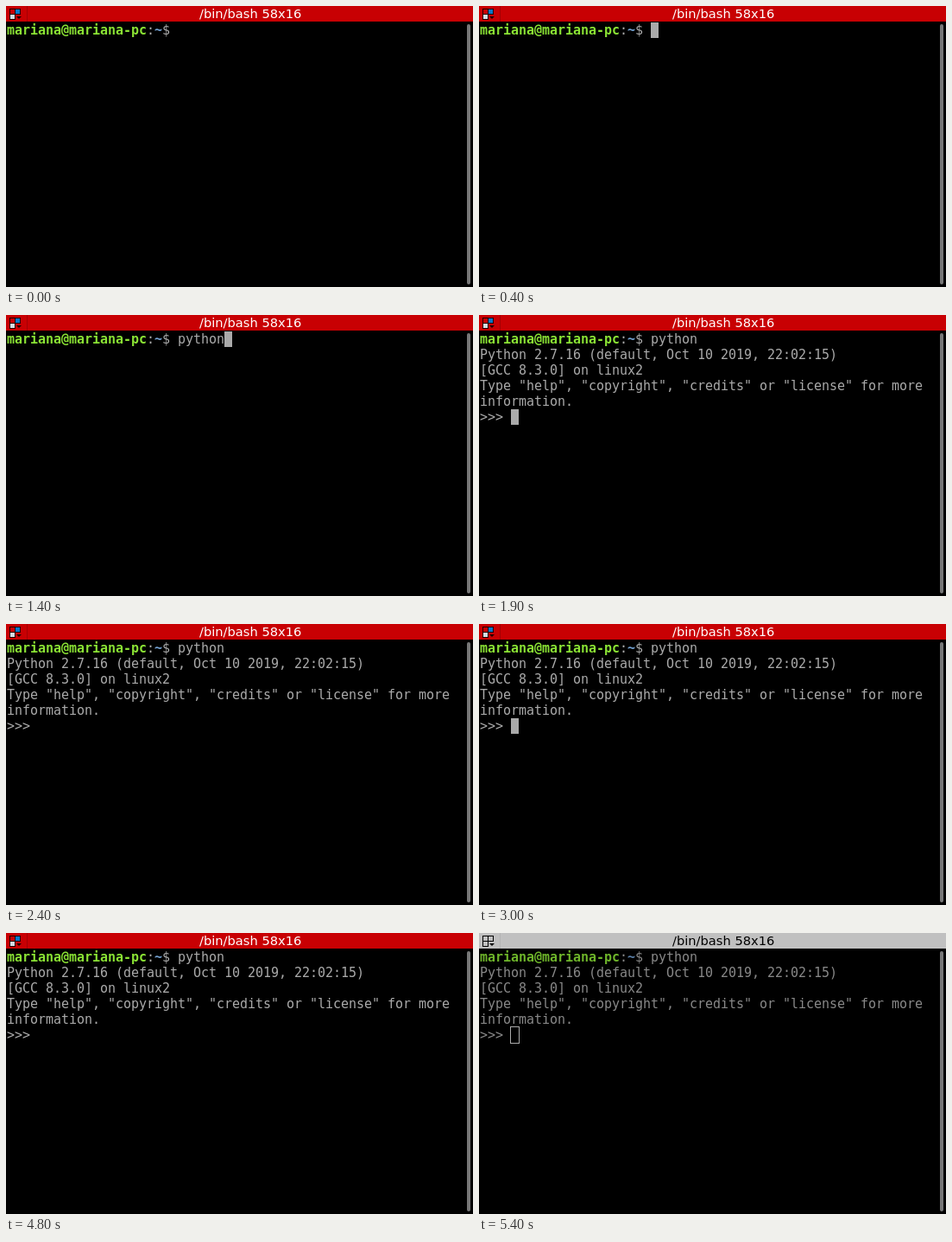
Write an HTML page with a canvas that moves like this. It is 541 by 325 pixels and loops after 7.2 s.

```html
<!DOCTYPE html>
<html lang="en">
<head>
<meta charset="utf-8">
<title>Terminal</title>
<style>
  html, body { margin: 0; width: 100%; height: 100%; overflow: hidden; background: #000; }
  canvas { display: block; }
</style>
</head>
<body>
<canvas id="stage" width="541" height="325"></canvas>
<script>
const ctx = document.getElementById('stage').getContext('2d');
const LOOP = 7200, START = 1900, BLUR = 5400, BLINK = 600;
const CELL = 9, ROW = 18, LEFT = 1, TOP = 19;
const MONO = '15px "DejaVu Sans Mono", monospace';

const THEMES = {
  active: { bar: '#c80003', edge: '#a50003', title: '#fff', text: '#aaa', user: '#8ae234', path: '#729fcf' },
  idle: { bar: '#c0c0c0', edge: '#b4b4b4', title: '#000', text: '#888', user: '#6eb52a', path: '#5b7fa6' }
};

const USER = 'mariana@mariana-pc';
const PROMPT_COLS = USER.length + 4;
const COMMAND = 'python';
// [time, typed characters]
const KEYS = [[500, 1], [700, 2], [1100, 5], [1400, 6]];
const BANNER = [
  'Python 2.7.16 (default, Oct 10 2019, 22:02:15)',
  '[GCC 8.3.0] on linux2',
  'Type "help", "copyright", "credits" or "license" for more',
  'information.',
  '>>>'
];

function box(x, y, w, h, color) {
  ctx.fillStyle = color;
  ctx.fillRect(x, y, w, h);
}

// Writes on the character grid and returns the next column.
function write(text, col, row, color, bold) {
  ctx.font = (bold ? 'bold ' : '') + MONO;
  ctx.fillStyle = color;
  for (const ch of text) ctx.fillText(ch, LEFT + CELL * col++, TOP + ROW * row + 14);
  return col;
}

function cursor(col, row, focused) {
  const x = LEFT + CELL * col, y = TOP + ROW * row;
  if (focused) return box(x, y, CELL, ROW, '#aaa');
  ctx.strokeStyle = '#aaa';
  ctx.lineWidth = 1;
  ctx.strokeRect(x - 0.5, y - 0.5, CELL + 1, ROW + 1);
}

function splitIcon(focused) {
  if (focused) {
    box(4, 3, 13, 7, '#200');
    box(4, 9, 7, 7, '#200');
    box(5, 4, 5, 5, '#c80003');
    box(11, 4, 5, 5, '#0878c8');
    box(5, 10, 5, 5, '#d4dce4');
  } else {
    box(4, 3, 13, 1, '#000');
    box(4, 9, 13, 1, '#000');
    box(4, 15, 7, 1, '#000');
    box(4, 3, 1, 13, '#000');
    box(10, 3, 1, 13, '#000');
    box(16, 3, 1, 7, '#000');
  }
  ctx.fillStyle = focused ? '#200' : '#000';
  ctx.beginPath();
  ctx.moveTo(12, 12);
  ctx.lineTo(18, 12);
  ctx.lineTo(15, 15);
  ctx.fill();
}

function titleBar(theme, focused) {
  box(0, 0, 541, 18, theme.bar);
  box(24, 0, 1, 18, theme.edge);
  splitIcon(focused);
  ctx.font = '14.667px "DejaVu Sans", sans-serif';
  ctx.fillStyle = theme.title;
  ctx.fillText('/bin/bash 58x16', 224, 14);
}

function scrollBar() {
  ctx.fillStyle = '#777';
  ctx.beginPath();
  ctx.roundRect(534, 21, 4, 301, 2);
  ctx.fill();
}

function draw(t) {
  const focused = t < BLUR;
  const theme = focused ? THEMES.active : THEMES.idle;
  box(0, 0, 541, 325, '#000');
  titleBar(theme, focused);
  scrollBar();

  let typed = 0;
  for (const [time, count] of KEYS) if (t >= time) typed = count;
  let col = write(USER, 0, 0, theme.user, true);
  col = write(':', col, 0, theme.text);
  col = write('~', col, 0, theme.path, true);
  write('$ ' + COMMAND.slice(0, typed), col, 0, theme.text);

  if (t < START) {
    if (t >= 400) cursor(PROMPT_COLS + typed, 0, true);
    return;
  }
  BANNER.forEach((line, i) => write(line, 0, i + 1, theme.text));
  const lit = t < 2400 || Math.floor((t - 2400) / BLINK) % 2 === 1;
  if (!focused || lit) cursor(4, 5, focused);
}

let start;
function tick(now) {
  start ??= now;
  draw((now - start) % LOOP);
  requestAnimationFrame(tick);
}
draw(0);
requestAnimationFrame(tick);
</script>
</body>
</html>
```
